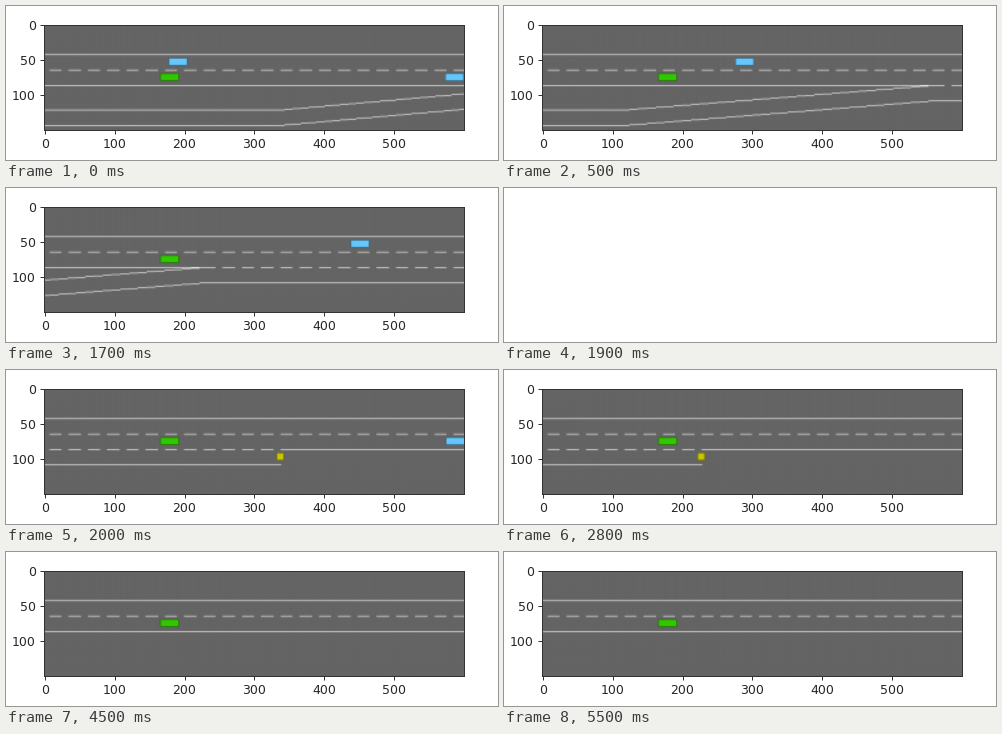
These frames come from a looping animation (492x154 px, 5.7 s). A matplotlib script:

```python
import numpy as np
import matplotlib.pyplot as plt
from matplotlib.animation import FuncAnimation

FRAMES, INTERVAL = 57, 100
HOLD = 5                 # animation frames per shown simulation step
BLANK = 19               # display is cleared for this one frame
W, H, SCALE = 600, 150, 5.5
BEND, MERGE, LANE_END, ROAD_END = 150, 230, 310, 460   # metres
SECONDS = [4, 6, 7, 9, 12, 13, 14, 16, 17, 17, 17, 17]

GREY, WHITE = (100, 100, 100), (255, 255, 255)
GREEN, BLUE, YELLOW = (50, 200, 0), (100, 200, 255), (200, 200, 0)


def ego_x(t):
    return 41.2 + 20 * t


def other_cars(t):
    """Distance ahead of the ego car and lateral position, in metres."""
    lead = np.interp(t, [4, 7, 9, 12, 13], [2.3, 29, 49.5, 74.2, 83])
    return [(lead, 0 if t < 11 else 4), (74 + 9 * (t - 4), 4)]


def averaging(n, m):
    """Matrix that area-averages n samples down to m."""
    edges = np.linspace(0, n, m + 1)
    lo = np.maximum(edges[:-1, None], np.arange(n))
    hi = np.minimum(edges[1:, None], np.arange(n) + 1)
    return np.clip(hi - lo, 0, None) * m / n


ROWS, COLS = averaging(H, 84), averaging(W, 335)


class Road:
    def __init__(self, x):
        self.x = x
        self.left = x - 0.3 * W / SCALE
        self.img = np.full((H, W, 3), GREY, dtype=float)

    def pix(self, x, y):
        u = (x - self.left) * SCALE
        v = 0.5 * H + (y - 4) * SCALE
        return int(np.floor(u + 1e-6)), int(np.floor(v + 1e-6))

    def line(self, x0, y0, x1, y1):
        (u0, v0), (u1, v1) = self.pix(x0, y0), self.pix(x1, y1)
        u = np.arange(max(u0, 0), min(u1, W - 1) + 1)
        if u.size:
            v = np.rint(v0 + (v1 - v0) * (u - u0) / max(u1 - u0, 1))
            self.img[v.astype(int), u] = WHITE

    def dashes(self, x0, x1, y):
        for x in range(x0, x1, 5):
            self.line(x, y, x + 3, y)

    def ramp(self, y):
        # a chord of the cosine ramp, cut at the drawing horizon
        length = MERGE - BEND
        horizon = 5 * (int(self.left - BEND) // 5 + 27)
        s = min(length, horizon)
        rise = 3.25 * (1 - np.cos(np.pi * s / length))
        self.line(BEND, y, BEND + s, y - rise)

    def box(self, x, y, w, h, color):
        u, v = self.pix(x, y)
        left, top = int(u - w / 2), int(v - h / 2)
        for inset, shade in ((0, 0.5), (1, 1)):
            a, b = max(left + inset, 0), max(left + w - inset, 0)
            self.img[top + inset:top + h - inset, a:b] = np.multiply(color, shade)

    def picture(self):
        small = np.einsum("ij,jkc,lk->ilc", ROWS, self.img, COLS, optimize=True)
        return np.clip(small / 255, 0, 1)


def render(t):
    road = Road(ego_x(t))
    road.line(0, -2, ROAD_END, -2)
    road.dashes(0, ROAD_END, 2)
    road.line(0, 6, MERGE, 6)
    road.dashes(MERGE, LANE_END, 6)
    road.line(LANE_END, 6, ROAD_END, 6)
    for y in (12.5, 16.5):
        road.line(0, y, BEND, y)
        road.ramp(y)
    road.line(MERGE, 10, LANE_END, 10)

    road.box(LANE_END, 8, 11, 11, YELLOW)
    for ahead, y in other_cars(t):
        road.box(road.x + ahead, y, 27, 11, BLUE)
    road.box(road.x, 4, 27, 11, GREEN)
    return road.picture()


plt.rcParams.update({"font.family": "DejaVu Sans", "font.size": 9,
                     "axes.linewidth": 0.72, "axes.edgecolor": "0.2"})
fig = plt.figure(figsize=(4.92, 1.54), dpi=100, facecolor="white")
ax = fig.add_axes([38.49 / 492, 30.49 / 154, 419.1 / 492, 104.9 / 154])
view = ax.imshow(render(SECONDS[0]), aspect="auto", interpolation="bilinear",
                 extent=(-0.5, W - 0.5, H - 0.5, -0.5))
ax.set_xticks(range(0, W, 100))
ax.set_yticks(range(0, H, 50))
ax.tick_params(length=3.15, width=0.72, pad=3.15, color="0.2", labelcolor="0.15")


def update(i):
    ax.set_visible(i != BLANK)
    view.set_data(render(SECONDS[i // HOLD]))
    return [view]


anim = FuncAnimation(fig, update, frames=FRAMES, interval=INTERVAL,
                     repeat=True, repeat_delay=0, blit=False)
plt.show()
```
